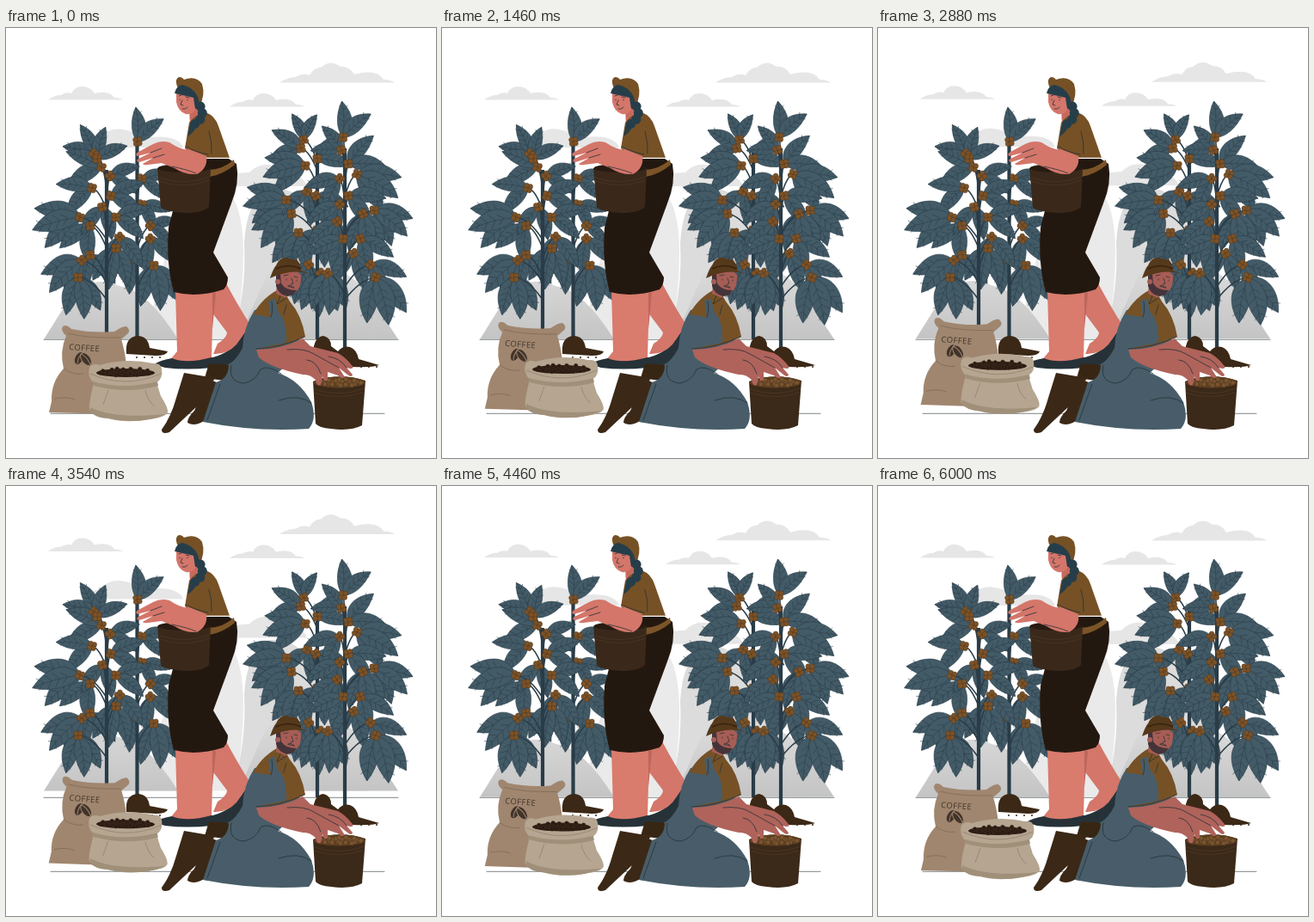
Write an HTML page that moves like this. It is 500 by 500 pixels and loops after 6040 ms.

```html
<!DOCTYPE html>
<html>
<head>
<meta charset="utf-8">
<style>
html, body { margin: 0; height: 100%; overflow: hidden; background: #fff; }
svg { display: block; width: 100vw; height: 100vh; }
.leaf { fill: #435a67; stroke: #2a3f4b; stroke-width: .6; }
.vein { fill: none; stroke: #2a3f4b; stroke-width: .55; }
.twig { fill: none; stroke: #2a3d48; stroke-width: 1.6; }
.stem { stroke: #293c47; stroke-width: 4.2; }
.berry { fill: #7b5228; stroke: #4a3018; stroke-width: .4; }
.ink { fill: none; stroke: #263238; stroke-width: .8; stroke-linecap: round; }
</style>
</head>
<body>
<svg viewBox="0 0 500 500">
  <defs>
    <linearGradient id="slope" x2="0" y2="1">
      <stop stop-color="#dedede"/><stop offset="1" stop-color="#c4c4c4"/>
    </linearGradient>
  </defs>

  <path class="ink" style="stroke-width:.6" d="M44 362.3H456M52 448.3H440"/>

  <g id="back">
    <g fill="#e6e6e6">
      <path d="M318 63.5Q328 57 337 57Q345 52 353 55Q358 46 366 46Q377 36 389 45Q399 44 405 54Q431 47 439 60Q448 60 452 63.5Z"/>
      <path id="puff" d="M49 83.5Q56 78 64 78Q70 74 76 76Q80 68 88 68Q98 68 103 76Q120 72 126 81Q133 81 136 83.5Z"/>
      <use href="#puff" x="211" y="8"/>
      <path d="M92 139Q98 129 110 127Q120 115 136 118Q150 120 157 128Q200 122 206 139Z"/>
      <path d="M240 184Q256 168 283 168Q292 158 306 159Q322 160 330 170Q346 172 350 184Z"/>
      <path fill="#eaeaea" d="M165 362Q184 230 225 190Q246 174 262 194Q276 215 276 262Q276 310 266 362Z"/>
      <path fill="#dcdcdc" d="M262 362Q280 310 277 250Q280 200 305 187Q345 180 370 240L420 362Z"/>
    </g>
    <path fill="url(#slope)" d="M44 362L74 314Q100 285 132 300Q165 305 200 362ZM456 362L426 316Q400 276 350 272Q312 260 296 304L270 362Z"/>
  </g>

  <g id="trees"></g>

  <path fill="#3b2816" d="M140 379Q138 359 153 358Q165 358 167 372L188 376Q187 381 174 381ZM357 378Q358 359 369 358Q378 360 378 370L386 376Q392 369 400 371Q408 374 410 385L434 392Q425 395 404 394L372 392Z"/>
  <path stroke="#3b2816" stroke-width="1.6" stroke-dasharray="2 7" d="M151 383H184M412 394H434"/>

  <g id="woman">
    <path fill="#263238" d="M236 384Q258 380 272 362L284 344Q293 348 286 356Q275 370 270 386Q250 398 234 395Z"/>
    <path fill="#d4766a" d="M238 305L256 297Q271 325 284 345L268 368Q257 380 241 379L246 367Q257 360 257 354L239 330Z"/>
    <path fill="#d97b6d" d="M197 306H241L239 386Q215 391 190 387L199 376Z"/>
    <path fill="#bd665b" d="M240 308H244L240 350Z"/>
    <path fill="#263238" d="M172 391Q180 386 193 384Q210 391 239 383Q255 386 267 380Q258 394 239 395Q210 398 185 395Z"/>
    <path fill="#23180f" d="M233 152H259L268 158Q272 180 262 204L241 261L258 290Q258 299 253 304Q222 314 195 307Q186 275 189 232L196 205Z"/>
    <path fill="#7b5428" d="M236 165Q253 164 265 153L266 159Q253 170 237 173Z"/>
    <path fill="#c7695e" d="M213 94L226 91L230 110L214 113Z"/>
    <path fill="#765126" d="M213 110Q222 99 232 98Q243 102 247 114L260 151H233Q216 149 208 140Z"/>
    <path stroke="#fff" stroke-width=".8" d="M232 151.2H260"/>
    <path class="ink" d="M236 120Q240 134 239 146M209 138Q220 144 235 147"/>
    <path fill="#765126" d="M199 68Q196 59 201 57Q205 57 207 60Q221 55 228 65Q232 78 225 91L210 76Z"/>
    <path fill="#d4766a" d="M198 75Q207 70 219 79L223 91Q217 102 209 100Q200 97 198 86Z"/>
    <path fill="#263e4a" d="M196 76Q198 67 205 66Q218 69 223 80L226 92L220 94L218 81Q205 78 196 76Z"/>
    <path class="ink" d="M201 79l3-1M209 80l4 1M205 84l-2 5l3 1M205 94q4 1 6-2M202 83v1M211 83v1"/>
    <path class="ink" style="stroke:#263e4a;stroke-width:11;stroke-dasharray:.1 8" d="M226 91Q233 104 219 112"/>
    <path fill="#263e4a" d="M214 112L222 114Q218 122 211 126Z"/>
    <path fill="#3a291b" d="M176 163Q207 151 238 163L236 208Q229 215 209 215Q188 214 180 209Z"/>
    <ellipse cx="207" cy="163" rx="30.5" ry="5" fill="#281b11"/>
    <path fill="none" stroke="#4d3824" stroke-width=".7" d="M178 174Q207 184 237 173M178 178Q207 188 237 177"/>
    <path fill="#d4766a" d="M208 139L233 149Q235 163 222 170Q208 171 196 163L181 157L165 159Q160 160 159 158L171 151L155 156Q150 155 154 152L168 145L153 149Q149 147 154 144L171 135Q180 130 190 133Q202 141 212 142Z"/>
    <path class="ink" d="M171 151L184 147M168 145L181 140M193 161Q212 165 221 169"/>
  </g>

  <g id="man">
    <path fill="#382614" d="M231 407L236 390L264 392L262 411Z"/>
    <path fill="#3b2816" d="M207 401L243 407L222 440L190 470Q181 473 181 467Q192 452 198 430ZM236 408L249 414L230 457Q219 464 211 459Q211 453 219 445Z"/>
    <path fill="#485d69" d="M289 328Q276 348 275 372Q268 386 259 391Q259 408 244 412L229 458Q290 470 352 466Q362 455 355 435Q341 409 316 401L345 375L326 322Z"/>
    <path class="ink" d="M249 414L234 456M262 392Q258 412 277 413Q291 410 296 397Q304 391 320 402M317 433Q340 425 355 436"/>
    <path fill="#765126" d="M315 305Q295 316 285 338L291 373Q319 373 348 359Q344 334 330 318L325 309Z"/>
    <path fill="#485d69" d="M305 318L312 314L317 331Q327 340 326 366L291 373L280 347L287 333L308 336Z"/>
    <path class="ink" d="M309 318Q311 329 308 336M326 322L323 333M291 373Q319 372 347 359M320 309L315 321L326 314"/>
    <path fill="#a75d55" d="M315 298L328 308L326 314L314 309ZM316 283Q330 275 343 287Q344 302 336 308Q325 311 317 299Z"/>
    <path fill="#44343a" d="M314 287L319 286L320 297Q325 305 338 305Q334 312 327 312Q316 309 314 300Z"/>
    <path class="ink" d="M323 288l5-1M335 289l4 1M332 291l2 6l-3 1M326 292v1M338 293v1M328 300q4-2 7 2z"/>
    <circle cx="316" cy="295" r="3" fill="#a75d55"/>
    <path fill="#55391b" d="M307 291Q311 279 314 276Q318 266 327 267Q333 270 338 269Q344 276 343 282L353 286Q332 279 307 291Z"/>
    <path fill="none" stroke="#352210" stroke-width="1.4" d="M314 280Q328 273 343 280"/>
    <path fill="#3b2919" d="M357 411Q388 400 418 410L414 462Q401 469 378 466Q364 465 360 460Z"/>
    <ellipse cx="387.5" cy="412" rx="30" ry="6.5" fill="#60401f"/>
    <g id="harvest" fill="#795531" stroke="#4d3319" stroke-width=".5"></g>
    <path fill="none" stroke="#533c25" stroke-width=".7" d="M358 420Q388 430 417 419M358 424Q388 434 417 423"/>
    <path fill="#af635b" d="M291 374Q320 374 345 361L354 370L386 378Q395 383 402 392Q406 396 400 396L396 395L403 403Q402 407 397 403L387 395L394 406Q390 409 386 404L374 400V409Q370 413 368 405L366 415Q361 417 360 409Q353 402 345 403Q307 395 294 383Z"/>
    <path class="ink" d="M327 374Q347 372 358 379L387 395M350 386Q361 387 366 402M375 382Q389 384 396 395"/>
  </g>

  <g id="sacks">
    <path fill="#a0866f" d="M66 347Q70 344 76 350Q100 355 126 353Q136 346 140 347Q145 351 142 355L134 362Q138 374 140 392L126 449L50 447L53 434Q52 412 67 396Q62 376 70 358Q63 352 66 347Z"/>
    <path fill="none" stroke="#806a55" stroke-width=".8" d="M72 355Q94 361 133 360M67 396Q78 404 90 402M56 431Q71 428 80 432"/>
    <text x="73" y="374" transform="rotate(4 73 374)" font-family="'Open Sans', Inter, sans-serif" font-size="9.5" letter-spacing=".4" fill="#41342a">COFFEE</text>
    <g fill="#41342a" stroke="#a0866f">
      <ellipse cx="85" cy="384" rx="5" ry="8" transform="rotate(28 85 384)"/>
      <ellipse cx="93" cy="385" rx="5" ry="8.5" transform="rotate(-36 93 385)"/>
      <path fill="none" d="M88 378Q83 384 83 390M88 379Q95 383 98 391"/>
    </g>
    <path fill="#b5a591" d="M97 395Q100 389 109 392Q140 383 171 390Q180 389 181 396Q183 408 175 412L180 428Q189 442 188 447Q185 453 166 455Q140 460 119 454Q103 453 97 444Q96 436 102 413Q94 405 97 395Z"/>
    <path fill="#a09079" d="M101 411Q137 421 176 411L177 416Q140 426 102 416ZM98 441Q125 455 186 449Q157 462 119 454Q103 453 98 446Z"/>
    <path fill="none" stroke="#8f7e69" stroke-width=".7" d="M98 402Q139 420 180 402M119 421L113 438M162 421Q165 434 173 440"/>
    <ellipse cx="139" cy="401" rx="34" ry="5" fill="#2a1b12"/>
    <g id="beans" fill="#2a1b12" stroke="#4c3526" stroke-width=".4"></g>
  </g>
</svg>
<script>
const $ = id => document.getElementById(id);

// A leaf drawn along +x, then turned about its base
function leaf(x, y, angle, len) {
  const w = len * .27, droop = Math.cos(angle * Math.PI / 180) > 0 ? w * .3 : -w * .3;
  let veins = `M0 0Q${len / 2} ${-droop} ${len} 0`;
  for (let k = .25; k < .8; k += .17) {
    const a = len * k, b = a + len * .12, h = w * .6 * Math.sin(k * 3);
    veins += `M${b} ${-h - droop * .5}L${a} ${-droop * .6}L${b} ${h - droop * .5}`;
  }
  return `<g transform="translate(${x} ${y}) rotate(${angle})">
    <path class="leaf" d="M0 0C${len * .2} ${-w - droop} ${len * .65} ${-w - droop} ${len} 0C${len * .6} ${w - droop} ${len * .2} ${w - droop} 0 0"/>
    <path class="vein" d="${veins}"/></g>`;
}

// Long sprays carry a third leaf in the middle
const spray = ([x, y, angle, len]) =>
  leaf(x, y, angle - 26, len) + leaf(x, y, angle + 26, len) + (len > 45 ? leaf(x, y, angle, len * 1.06) : '');

const dot = (x, y, r) => `<circle cx="${x}" cy="${y}" r="${r}"/>`;
const cluster = ([x, y]) => '<g class="berry">' + [0, 1, 2, 3].map(i =>
  dot(x + 3.2 * Math.cos(i * 1.6 + x), y + 3.2 * Math.sin(i * 1.6 + x), 2.9)).join('') + '</g>';

function plant(stem, top, bottom, sprays) {
  const twig = ([x, y]) => `<path class="twig" d="M${stem} ${y + 26}Q${(stem + x) / 2} ${y + 2} ${x} ${y}"/>`;
  const all = draw => sprays.map(draw).join('');
  return all(spray) + `<path class="stem" d="M${stem} ${top}V${bottom}"/>` + all(twig) + all(cluster);
}

$('trees').innerHTML =
  plant(152.5, 128, 362, [
    [153, 132, -67, 40], [158, 175, 18, 34], [158, 205, 40, 34], [168, 230, 15, 32],
    [168, 245, 70, 42], [150, 268, 125, 42], [172, 276, 82, 50]
  ]) +
  plant(117, 165, 354, [
    [102, 146, -141, 37], [106, 152, -49, 38], [111, 162, 178, 45], [100, 186, 160, 42],
    [121, 172, 8, 36], [122, 195, 5, 42], [86, 220, 165, 54], [98, 230, 118, 44],
    [112, 208, 100, 40], [128, 220, 12, 40], [132, 243, 80, 44], [98, 264, 75, 44],
    [128, 256, 100, 46], [88, 270, 135, 50], [84, 290, 82, 46]
  ]) +
  plant(362, 142, 362, [
    [346, 130, -88, 33], [343, 140, 186, 40], [348, 160, 165, 48], [362, 152, -15, 40],
    [326, 200, 172, 48], [332, 216, 132, 50], [350, 190, 110, 40], [360, 195, 45, 40],
    [340, 238, 105, 46], [362, 235, 105, 44], [352, 275, 110, 46], [366, 285, 92, 48]
  ]) +
  plant(394, 140, 376, [
    [392, 127, -66, 42], [390, 142, -155, 36], [398, 158, -22, 44], [408, 170, 30, 52],
    [388, 175, 140, 42], [398, 195, 30, 44], [388, 205, 125, 44], [428, 212, 38, 46],
    [415, 216, 85, 46], [385, 225, 115, 44], [392, 245, 130, 44], [412, 245, 55, 44],
    [404, 262, 100, 44], [424, 275, 45, 44], [430, 290, 75, 54], [374, 285, 88, 46]
  ]);

const heap = (n, cx, cy, rx, ry, r) => Array.from({ length: n }, (_, i) => {
  const a = i * 2.4, k = Math.sqrt((i + .5) / n);
  return dot(cx + rx * k * Math.cos(a), cy + ry * k * Math.sin(a), r);
}).join('');
$('beans').innerHTML = heap(32, 139, 400, 31, 4.2, 2.3);
$('harvest').innerHTML = heap(26, 390, 412, 25, 4, 2.6);

const rise = (t, period) => (1 - Math.cos(2 * Math.PI * t / period)) / 2;
function frame(now) {
  const t = now % 6040, s = rise(t, 6040);
  $('back').setAttribute('transform', `translate(0 ${-9.5 * rise(t, 1510)})`);
  $('sacks').setAttribute('transform', `translate(0 ${-8.5 * s}) rotate(${.5 * s} 120 400)`);
  requestAnimationFrame(frame);
}
frame(performance.now());
</script>
</body>
</html>
```
